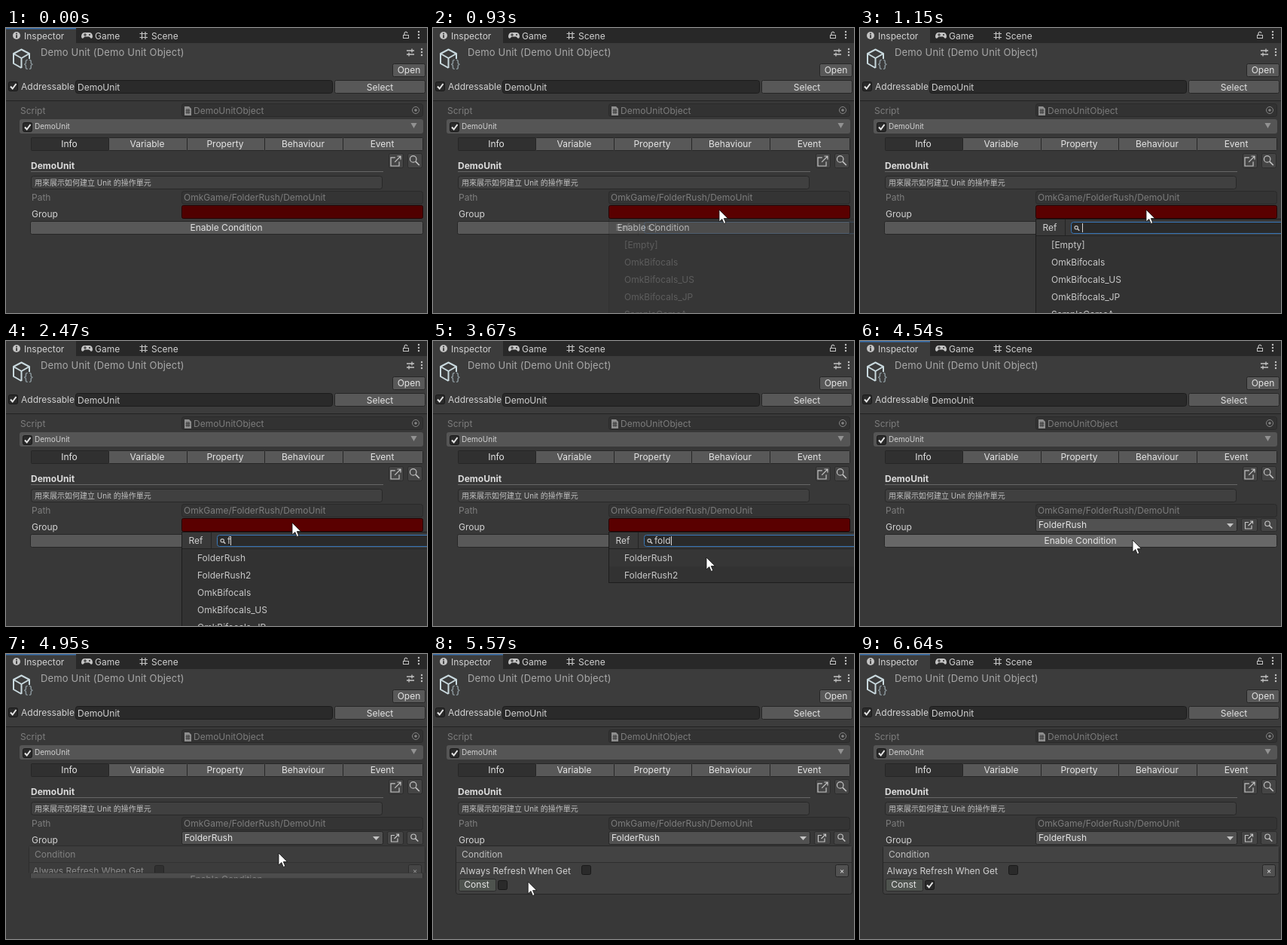
Write an HTML page that moves like this. It is 559 by 378 pixels and loops after 7.37 s.

```html
<!DOCTYPE html>
<html lang="en">
<head>
<meta charset="utf-8">
<title>Inspector demo</title>
<style>
  html, body { margin: 0; width: 100%; height: 100%; overflow: hidden; background: #383838; }
  svg { display: block; width: 559px; height: 378px; }
  text { font-family: Inter, "Noto Sans CJK TC", "Noto Sans CJK", sans-serif; white-space: pre; }
</style>
</head>
<body>
<svg id="stage" viewBox="0 0 559 378" xmlns="http://www.w3.org/2000/svg"></svg>
<script>
const LOOP = 7370;
const UNIT = 'DemoUnit';
const GAME = 'FolderRush';
const PLATFORM = 'OmkBifocals';
const QUERY = 'fold';
const LIGHT = '#d2d2d2', ICON = '#c4c4c4', DIM = '#7d7d7d', EDGE = '#262626';

// Markup helpers
const rect = (x, y, w, h, fill, extra = '') =>
  `<rect x="${x}" y="${y}" width="${w}" height="${h}" fill="${fill}" ${extra}/>`;
const box = (x, y, w, h, fill, edge = EDGE, r = 2, extra = '') =>
  rect(x + .5, y + .5, w - 1, h - 1, fill, `stroke="${edge}" rx="${r}" ${extra}`);
const text = (x, y, s, fill = LIGHT, size = 12, extra = '') =>
  `<text x="${x}" y="${y}" fill="${fill}" font-size="${size}" ${extra}>${s}</text>`;
const mid = (x, y, s, fill = '#e4e4e4', size = 12) =>
  text(x, y, s, fill, size, 'text-anchor="middle"');
const line = (d, color, w = 1, extra = '') =>
  `<path d="${d}" fill="none" stroke="${color}" stroke-width="${w}" ${extra}/>`;
const shape = (d, color) => `<path d="${d}" fill="${color}"/>`;
const dot = (x, y, r, color) => `<circle cx="${x}" cy="${y}" r="${r}" fill="${color}"/>`;
const ring = (x, y, r, color, w = 1) =>
  `<circle cx="${x}" cy="${y}" r="${r}" fill="none" stroke="${color}" stroke-width="${w}"/>`;
const group = (id, inner, extra = '') => `<g id="${id}" ${extra}>${inner}</g>`;

const button = (x, y, w, h, label, base = y + h / 2 + 4) =>
  box(x, y, w, h, '#585858') + mid(x + w / 2, base, label);
const tick = (x, y) => line(`M${x + 3} ${y + 6.5}l2.7 3 4.8-6.5`, '#e6e6e6', 2);
const check = (x, y, on) => box(x, y, 13, 13, '#2a2a2a', '#191919', 2) + (on ? tick(x, y) : '');
const kebab = (x, y) => [-4, 0, 4].map(d => dot(x, y + d, 1.2, ICON)).join('');
const lens = (x, y, k) =>
  ring(x - k * .25, y - k * .25, k * .65, ICON, 1.2) +
  line(`M${x + k * .25} ${y + k * .25}L${x + k} ${y + k}`, ICON, 1.6);
const openIcon = (x, y, k) =>
  line(`M${x - k * .1} ${y - k * .7}H${x - k}V${y + k}H${x + k * .7}V${y + k * .1}` +
       `M${x - k * .2} ${y + k * .2}L${x + k} ${y - k}M${x + k * .3} ${y - k}H${x + k}V${y - k * .3}`, ICON, 1.2);
const tool = (x, y, w, h, icon) => box(x, y, w, h, '#454545', '#2c2c2c') + icon;

function topBar() {
  const pad = shape('M104.5 6h6q4 0 4.5 5q0 3.5-2.5 2.5l-2-2h-6l-2 2q-2.5 1-2.5-2.5q.5-5 4.5-5z', ICON) +
    line('M103 9h4M105 7v4', '#282828') + dot(111, 9, 1, '#282828');
  return rect(0, 0, 559, 20, '#282828') + rect(0, 0, 93, 20, '#3c3c3c') +
    group('focus', rect(0, 0, 93, 1.5, '#3a72b0')) +
    dot(14, 10, 5, ICON) + rect(13.2, 9.2, 1.7, 4, '#333') + dot(14, 7.4, 1, '#333') +
    text(24, 15, 'Inspector') + pad + text(118, 15, 'Game') +
    line('M180.5 5v10M185 5v10M177.5 7.5H188M177.5 12.5H188', ICON, 1.2) +
    text(193, 15, 'Scene') +
    box(527, 9, 8, 5, 'none', ICON, 0) + line('M529 9V7q2-4 4 0', ICON, 1.2) + kebab(548, 9);
}

function header() {
  return rect(0, 20, 559, 76, '#3c3c3c') + rect(0, 96, 559, 1, '#222') +
    line('M31 41V34L20.5 28.5 10 34V47L20.5 53M10 34L20.5 40 31 34M20.5 40V53', '#c9d9de', 2,
         'stroke-linejoin="round"') +
    text(23, 52.5, '{}', '#89959a', 15, 'font-weight="500" letter-spacing=".5"') +
    text(46, 37, 'Demo Unit (Demo Unit Object)', '#a9a9a9', 13, 'letter-spacing=".16"') +
    line('M532 30h10M532 35h10M539 27.5v5M535 32.5v5', ICON, 1.3) + kebab(552, 32) +
    button(513, 47, 44, 18, 'Open') +
    check(3, 71, true) + text(20, 82, 'Addressable') +
    box(92, 69, 342, 18, '#2a2a2a', '#1c1c1c', 3) + text(95, 83, UNIT) +
    button(436, 69, 121, 18, 'Select', 83);
}

function body() {
  const tabs = ['Info', 'Variable', 'Property', 'Behaviour', 'Event'].map((s, i, all) => {
    const x = Math.floor(33 + i * 103.6);
    const end = i < all.length - 1 ? Math.floor(33 + (i + 1) * 103.6) + 1 : 554;
    return box(x, 145, end - x, 18, i ? '#585858' : '#303030', EDGE, 1) + mid((x + end) / 2 - 1, 158, s);
  }).join('');
  return text(19, 114, 'Script', DIM) +
    box(233, 100, 321, 18, '#323232', '#2a2a2a', 3) +
    shape('M237 104h6l3 3v9h-9z', '#8f8f8f') +
    line('M240.3 107v7M242.7 107v7M238.5 109.2h6M238.5 111.8h6', '#323232', .9) +
    text(249, 114, 'DemoUnitObject', DIM) + ring(544, 109, 4.5, '#858585') + dot(544, 109, 1.8, '#858585') +
    rect(18, 121, 536, 19, '#555', 'rx="3"') + check(22, 125, true) +
    text(38, 134, UNIT, LIGHT, 10) + shape('M537.5 126h8l-4 7z', '#929292') +
    tabs +
    text(33, 187, UNIT, '#dcdcdc', 12, 'font-weight="700"') + rect(33, 190, 468, 1, '#666') +
    tool(508, 166, 20, 20, openIcon(517.5, 176.5, 6.5)) + tool(533, 166, 20, 20, lens(542.3, 175.5, 6.5)) +
    box(33, 196, 467, 18, '#404040', '#272727', 3) +
    text(38, 209, '用來展示如何建立 Unit 的操作單元', '#c2c2c2', 10) +
    text(34, 229, 'Path', DIM) + box(233, 216, 321, 18, '#343434', '#2a2a2a', 3) +
    text(236, 229, `OmkGame/${GAME}/${UNIT}`, DIM) +
    text(34, 251, 'Group');
}

function groupField() {
  return group('empty', box(233, 235, 321, 18, '#500000', '#250000', 2, 'id="red"')) +
    group('chosen', box(233, 235, 268, 18, '#515151') + text(237, 248, GAME, '#e4e4e4') +
      shape('M487 242h9l-4.5 5z', ICON) +
      tool(506, 235, 22, 18, openIcon(516.5, 244, 5)) + tool(532, 235, 22, 18, lens(542.3, 243.5, 5)));
}

function condition() {
  return box(30, 254, 527, 65, '#404040', EDGE, 3) +
    rect(31, 255, 525, 21, '#434343') + rect(31, 276, 525, 1, '#2e2e2e') +
    text(38, 270, 'Condition', '#bdbdbd') +
    text(35.5, 292, 'Always Refresh When Get') + check(197, 280, false) +
    box(534, 279, 18, 17, '#515151') + mid(543, 290.5, '×', '#e4e4e4', 10) +
    box(34, 298, 50, 17, '#4e534e', '#2b2b2b') + mid(58, 310, 'Const') +
    box(86, 300, 13, 13, '#2a2a2a', '#191919', 2, 'id="constBox"') + group('constTick', tick(86, 300));
}

function popup() {
  const rows = [0, 1, 2, 3, 4].map(i => text(254, 292 + 23 * i, '', '#c8c8c8', 12, 'class="row"')).join('');
  return rect(233.5, 253.5, 340, 140, '#323232', 'id="panel" stroke="#1d1d1d"') +
    rect(234, 254, 330, 21, '#393939') + rect(272, 254, 1, 21, '#242424') + rect(234, 275, 330, 1, '#222') +
    text(242.5, 268.5, 'Ref') + rect(234, 276, 330, 23, '#363636', 'id="hoverRow"') +
    box(280, 257, 300, 16, '#2a2a2a', '#3a79bb', 3) + lens(288, 265.5, 3.3) +
    text(294, 269, '', LIGHT, 12, 'id="query"') + rect(295, 259, 1, 12, '#d8d8d8', 'id="caret"') + rows;
}

const stage = document.getElementById('stage');
stage.innerHTML =
  `<defs><clipPath id="openClip">${rect(0, 252, 559, 0, '#000', 'id="openRect"')}</clipPath>` +
  `<clipPath id="btnClip">${rect(0, 255, 559, 0, '#000', 'id="btnRect"')}</clipPath></defs>` +
  rect(0, 0, 559, 378, '#383838') + topBar() + header() + body() + groupField() +
  `<g clip-path="url(#btnClip)">${group('enable', box(32, 256, 522, 18, '#585858', EDGE, 2, 'id="enableBox"') +
    mid(292.5, 269, 'Enable Condition'))}</g>` +
  `<g clip-path="url(#openClip)">${group('condition', condition())}</g>` +
  group('popup', popup()) +
  group('cursor', '<path d="M0 0V16L3.8 12.5 6.3 18.5 8.8 17.4 6.3 11.6H11.5Z" fill="#fff" stroke="#111" stroke-width=".8"/>');

const el = {};
stage.querySelectorAll('[id]').forEach(n => el[n.id] = n);
const rowEls = [...stage.querySelectorAll('.row')];

const set = (n, attrs) => { for (const k in attrs) n.setAttribute(k, attrs[k]); };
const show = (n, on) => n.setAttribute('visibility', on ? 'visible' : 'hidden');
const mix = (a, b, p) => a + (b - a) * p;

// Progress in n equal jumps: the first lands at a, the last at b.
const steps = (t, a, b, n) =>
  t < a ? 0 : Math.min(1, (Math.floor((t - a) / (b - a) * (n - 1) + .01) + 1) / n);

// start, end, jumps, x, y
const moves = [
  [400, 670, 5, 380, 241],
  [3400, 3670, 4, 363, 287],
  [4200, 4540, 5, 362, 264],
  [5230, 5500, 4, 135, 301],
  [5570, 5840, 5, 91, 306],
  [6500, 6640, 3, 205, 386]
];

function pointer(t) {
  let x = 366, y = 392;
  for (const [a, b, n, tx, ty] of moves) {
    const p = steps(t, a, b, n);
    x = mix(x, tx, p);
    y = mix(y, ty, p);
  }
  return [x, y];
}

function listFor(typed) {
  const own = [GAME, GAME + '2'];
  const platforms = [PLATFORM, PLATFORM + '_US', PLATFORM + '_JP'];
  if (!typed) return ['[Empty]', ...platforms, 'SampleGameA'];
  return typed < 3 ? [...own, ...platforms] : own;
}

function drawPopup(t) {
  const p = steps(t, 930, 1150, 4);
  const on = p > 0 && t < 3800;
  show(el.popup, on);
  if (!on) return;
  const typed = [2470, 2670, 2810, 2870].filter(s => t >= s).length;
  const list = listFor(typed);
  el.popup.setAttribute('opacity', p);
  el.panel.setAttribute('height', t >= 2940 ? 67 : 140);
  el.query.textContent = QUERY.slice(0, typed);
  el.caret.setAttribute('x', typed ? Math.round(294 + el.query.getComputedTextLength()) : 295);
  rowEls.forEach((n, i) => n.textContent = list[i] || '');
  el.hoverRow.setAttribute('opacity', t >= 3670 ? 1 : 0);
}

function draw(t) {
  const [x, y] = pointer(t);
  set(el.cursor, { transform: `translate(${x.toFixed(1)} ${y.toFixed(1)})` });

  show(el.focus, t < 930 || t >= 3800);
  el.red.setAttribute('fill', t >= 930 && t < 3800 ? '#5a0000' : '#500000');
  show(el.empty, t < 3930);
  show(el.chosen, t >= 3930);

  const open = steps(t, 4810, 5160, 6) ** .86;
  const top = 256 + 61 * open;
  set(el.enable, { transform: `translate(0 ${top - 256})`, opacity: 1 - open });
  set(el.btnRect, { y: top - 1, height: 19 * (1 - open) });
  set(el.openRect, { height: open ? 2 + 66 * open : 0 });
  set(el.condition, { opacity: open });
  el.enableBox.setAttribute('fill', t >= 4200 && y < 274 ? '#676767' : '#585858');

  show(el.constTick, t >= 5840);
  el.constBox.setAttribute('stroke', t >= 5770 && t < 6500 ? '#606060' : '#191919');
  drawPopup(t);
}

const start = performance.now();
function loop() {
  draw((performance.now() - start) % LOOP);
  requestAnimationFrame(loop);
}
loop();
</script>
</body>
</html>
```
